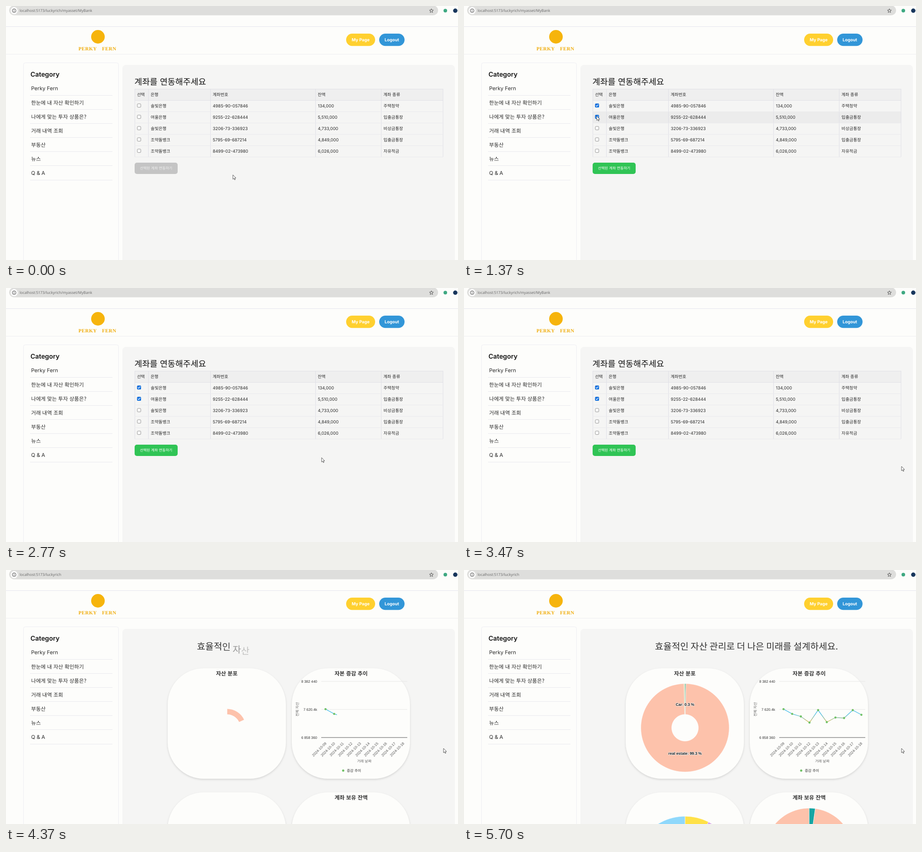
Write an HTML page that moves like this. It is 998x561 px and loops after 5.73 s.

```html
<!DOCTYPE html>
<html lang="ko">
<head>
<meta charset="utf-8">
<title>Account linking</title>
<style>
  html, body { margin: 0; width: 100%; height: 100%; overflow: hidden; background: #fdfdfb; }
  svg { display: block; width: 998px; height: 561px; }
  text { text-rendering: geometricPrecision; white-space: pre; }
  .card { filter: drop-shadow(0 2px 2px rgba(0, 0, 0, .13)); }
</style>
</head>
<body>
<script>
const LOOP = 5730, LOADING = 3500, READY = 4080, CHART = 4090;
const KO = "'Noto Sans CJK KR', 'Noto Sans CJK JP', 'Noto Sans CJK', sans-serif";
const INTER = "Inter, sans-serif";
const ARIAL = "'Liberation Sans', Arial, sans-serif";
const PAGE = '#fdfdfb', SALMON = '#fdc2ab';

function el(parent, tag, attrs = {}) {
  const node = document.createElementNS('http://www.w3.org/2000/svg', tag);
  for (const key in attrs) node.setAttribute(key, attrs[key]);
  parent.append(node);
  return node;
}
const group = (parent, attrs) => el(parent, 'g', attrs);
const rect = (parent, x, y, width, height, fill, rx = 0, more = {}) =>
  el(parent, 'rect', { x, y, width, height, fill, rx, ...more });
const circle = (parent, cx, cy, r, fill, more = {}) => el(parent, 'circle', { cx, cy, r, fill, ...more });
const line = (parent, x1, y1, x2, y2, stroke) => el(parent, 'line', { x1, y1, x2, y2, stroke });

// Text is placed by its vertical centre.
function label(parent, str, x, cy, size, more = {}) {
  const korean = /[가-힣]/.test(str);
  const node = el(parent, 'text', {
    x, y: cy + size * (korean ? 0.4 : 0.36), 'font-size': size, fill: '#2a2a2a',
    'font-family': korean ? KO : INTER, ...more
  });
  node.textContent = str;
  return node;
}
const show = (node, on) => node.setAttribute('visibility', on ? 'visible' : 'hidden');
const clamp = v => Math.max(0, Math.min(1, v));
const sine = v => (1 - Math.cos(Math.PI * clamp(v))) / 2;

const svg = el(document.body, 'svg', { viewBox: '0 0 998 561' });
const defs = el(svg, 'defs');

// Page frame
rect(svg, 0, 0, 998, 561, PAGE);
rect(svg, 257, 130, 734, 460, '#f5f5f4', 8);
line(svg, 0, 45.5, 998, 45.5, '#e4e4ee');
line(svg, 0, 106.5, 998, 106.5, '#ededf0');
rect(svg, 38.5, 125.5, 210, 460, 'none', 4, { stroke: '#eeeef3' });

circle(svg, 203, 68, 15, '#f6b40c');
const brand = { 'font-family': "'Liberation Serif', Times, serif", 'font-weight': 700, fill: '#f0ae10', 'letter-spacing': 0.4 };
label(svg, 'PERKY', 160, 94.2, 11, brand);
label(svg, 'FERN', 212, 94.2, 11, brand);

function pill(x, width, fill, str) {
  rect(svg, x, 61, width, 27.3, fill, 13.6);
  label(svg, str, x + width / 2, 74.8, 9.4, { 'text-anchor': 'middle', 'font-weight': 700, fill: '#fff' });
}
pill(751, 64, '#ffd02f', 'My Page');
pill(824, 56, '#3296d8', 'Logout');

label(svg, 'Category', 54, 151.3, 14.3, { 'font-weight': 600, fill: '#111' });
['Perky Fern', '한눈에 내 자산 확인하기', '나에게 맞는 투자 상품은?', '거래 내역 조회', '부동산', '뉴스', 'Q & A']
  .forEach((str, i) => {
    const y = 182.2 + i * 31.05;
    label(svg, str, 55.5, y, 11.6);
    line(svg, 53, Math.round(y + 15) + 0.5, 235, Math.round(y + 15) + 0.5, '#e9e9ee');
  });

// Account table
const bank = group(svg);
label(bank, '계좌를 연동해주세요', 283.5, 167, 18.5, { fill: '#111' });
rect(bank, 284, 183, 681, 25, '#efefef');
const colX = [284.5, 314.5, 451.5, 683.5, 828.5, 965];
const rowY = i => 208 + i * 25;
const hovers = [0, 1, 2, 3, 4].map(i => rect(bank, 284, rowY(i), 681, 25, '#ececec'));
colX.forEach(x => line(bank, x, 183, x, 333, '#dfdfe6'));
for (let i = -1; i < 6; i++) line(bank, 284, rowY(i) + 0.5, 965, rowY(i) + 0.5, i < 1 ? '#e0e0e6' : '#eaeaed');
['선택', '은행', '계좌번호', '잔액', '계좌 종류'].forEach((str, c) =>
  label(bank, str, colX[c] + 4.7, 195.5, 9.4, { 'font-weight': 500 }));

const ticks = [];
[
  ['솔빛은행', '4985-90-057846', '134,000', '주택청약'],
  ['여울은행', '9255-22-628444', '5,510,000', '입출금통장'],
  ['솔빛은행', '3206-73-336923', '4,733,000', '비상금통장'],
  ['조약돌뱅크', '5795-69-687214', '4,849,000', '입출금통장'],
  ['조약돌뱅크', '8499-02-473980', '6,026,000', '자유적금']
].forEach((row, i) => {
  const y = rowY(i) + 12.5;
  row.forEach((str, c) => label(bank, str, colX[c + 1] + 5, y, 9.4));
  rect(bank, 290, y - 4.5, 7.6, 7.6, '#fff', 1.5, { stroke: '#777', 'stroke-width': 0.8 });
  const tick = group(bank);
  rect(tick, 289.5, y - 5, 8.6, 8.6, '#0d6fe0', 1.5);
  el(tick, 'path', { d: `M291.4 ${y - 0.7}l1.7 1.8 3.3-3.9`, fill: 'none', stroke: '#fff', 'stroke-width': 1.3 });
  ticks.push(tick);
});
const button = rect(bank, 284, 346, 95, 25, '#c4c4c4', 5);
const buttonText = label(bank, '선택된 계좌 연동하기', 331.5, 358.2, 8.1,
  { 'text-anchor': 'middle', 'font-weight': 500, fill: '#f0f0f0' });

// Dashboard
const dash = group(svg);
const SLOGAN = '효율적인 자산 관리로 더 나은 미래를 설계하세요.';
let penX = 421.5;
const letters = [...SLOGAN].map(ch => {
  const node = el(dash, 'text', { x: penX, y: 176.2, 'font-size': 20.2, 'font-family': KO, fill: '#333' });
  node.textContent = ch;
  penX += 20.2 * (ch === ' ' ? 0.224 : 0.92);
  return node;
});

[[357, 217], [631, 217], [357, 491], [631, 491]].forEach(([x, y]) =>
  rect(dash, x, y, 261, 244, PAGE, 80, { class: 'card' }));
[['자산 분포', 487.5, 228], ['자본 증감 추이', 762, 228], ['계좌 보유 잔액', 762, 502]].forEach(([str, x, y]) =>
  label(dash, str, x, y, 12, { 'text-anchor': 'middle', 'font-weight': 700, fill: '#333' }));

function sector(cx, cy, r0, r, from, to) {
  const at = (rad, deg) => {
    const a = (deg - 90) * Math.PI / 180;
    return `${cx + rad * Math.cos(a)} ${cy + rad * Math.sin(a)}`;
  };
  const big = to - from > 180 ? 1 : 0;
  return `M${at(r, from)}A${r} ${r} 0 ${big} 1 ${at(r, to)}L${at(r0, to)}A${r0} ${r0} 0 ${big} 0 ${at(r0, from)}Z`;
}
// Slices are [end angle, colour]; the whole pie opens from the top while it grows.
function pie(cx, cy, r0, r, slices) {
  const nodes = slices.map(([, fill]) => el(dash, 'path', { fill, stroke: '#fff', 'stroke-width': 0.6 }));
  return p => {
    let from = 0;
    slices.forEach(([to], i) => {
      nodes[i].setAttribute('d', sector(cx, cy, r0, r0 + (r - r0) * p, from * p, to * p));
      nodes[i].setAttribute('opacity', p > 0 ? 1 : 0);
      from = to;
    });
  };
}
const pies = [
  pie(488, 348.5, 29.5, 97.5, [[1.3, '#3f9f7f'], [358.7, SALMON], [359.99, '#c9d8a8']]),
  pie(488, 658, 1, 114, [[27, '#ffe148'], [120, '#d9a6e6'], [250, SALMON], [359.99, '#8fd8fb']]),
  pie(762, 624, 1, 98, [[8, '#16a5a3'], [359.99, SALMON]])
];
const pieLabels = [['Car: 0.3 %', 296.5], ['real estate: 99.3 %', 405]].map(([str, y]) =>
  label(dash, str, 488, y, 8.5, {
    'text-anchor': 'middle', 'font-weight': 700, 'font-family': ARIAL, fill: '#111',
    stroke: '#fff', 'stroke-width': 1.6, 'stroke-linejoin': 'round', 'paint-order': 'stroke'
  }));

// Line chart
const small = { 'font-family': ARIAL, fill: '#555', 'text-anchor': 'end' };
[['8 382 440', 246], ['7 620.4k', 308], ['6 858 360', 370]].forEach(([str, y], i) => {
  line(dash, 696, y, 886, y, i < 2 ? '#e6e6e6' : '#555');
  label(dash, str, 687, y, 7.9, { ...small, fill: '#333' });
});
label(dash, '전체 자산', 0, 0, 8, { 'text-anchor': 'middle', fill: '#666', transform: 'translate(643 307.5) rotate(-90)' });
label(dash, '거래 날짜', 791, 421.3, 8, { 'text-anchor': 'middle', fill: '#666' });
circle(dash, 744.5, 443, 2.5, '#72c267');
label(dash, '증감 추이', 752.5, 442.8, 8, { fill: '#333' });

const grad = el(defs, 'linearGradient', { id: 'trend', gradientUnits: 'userSpaceOnUse', x1: 0, y1: 307, x2: 0, y2: 337 });
[[0, '#36b4ee'], [0.4, '#45bbe0'], [1, '#e2b233']].forEach(([offset, color]) =>
  el(grad, 'stop', { offset, 'stop-color': color }));
const clip = rect(el(defs, 'clipPath', { id: 'reveal' }), 696, 236, 0, 140, '#000');
const trend = group(dash, { 'clip-path': 'url(#reveal)' });
const points = [307.3, 317.8, 323.5, 337, 309.5, 336, 325.8, 327, 309.5, 319.8].map((y, i) => [705.5 + i * 19.1, y]);
el(trend, 'polyline', { points: points.join(' '), fill: 'none', stroke: 'url(#trend)', 'stroke-width': 1.3 });
points.forEach(([x, y], i) => {
  circle(trend, x, y, 2.4, '#72c267');
  label(dash, '2024-10-' + String(9 + i).padStart(2, '0'), 0, 0, 8,
    { ...small, transform: `translate(${x + 0.5} 381.5) rotate(-45)` });
});

// Loading overlay
const overlay = group(svg);
rect(overlay, 0, 45, 998, 516, 'rgba(0,0,0,.5)');
circle(overlay, 519.3, 323.3, 32, 'none', { stroke: '#f2f2f2', 'stroke-width': 10 });
const arc = el(overlay, 'path', { d: sector(0, 0, 27, 37, -45, 45), fill: '#3498db' });

// Browser bar
rect(svg, 7, -1, 947, 21.5, '#dededc', 10.7);
circle(svg, 18, 10.3, 8, '#fafafa');
circle(svg, 18, 10.3, 4, 'none', { stroke: '#444', 'stroke-width': 1 });
el(svg, 'path', { d: 'M18 9.8v2.6M18 8v1', stroke: '#444', 'stroke-width': 1 });
const url = label(svg, '', 30, 10.4, 8.2, { 'font-family': "'Open Sans', 'Noto Sans', sans-serif", fill: '#666' });
const star = Array.from({ length: 10 }, (_, i) => {
  const a = i * Math.PI / 5, r = i % 2 ? 2 : 4.6;
  return [939.3 + r * Math.sin(a), 10.6 - r * Math.cos(a)];
});
el(svg, 'polygon', { points: star.join(' '), fill: 'none', stroke: '#444', 'stroke-width': 0.9, 'stroke-linejoin': 'round' });
circle(svg, 970, 10.3, 4, '#3fa982');
circle(svg, 992, 10.3, 4.8, '#17365c');

// Pointer: [time, x, y]
const PATH = [
  [0, 501, 373], [60, 500, 372], [330, 380, 283], [520, 308, 233.5], [580, 308, 233.5], [720, 293, 219], [950, 293, 219],
  [1150, 293, 243], [1600, 293, 243], [1850, 318, 300], [2070, 342, 344], [2200, 340, 358],
  [2450, 340, 358], [2720, 640, 372], [2980, 930, 386], [3080, 966, 394], [LOOP, 966, 394]
];
const pointer = el(svg, 'path', {
  d: 'M0 0V9.6L2.2 7.6 3.8 11 5.3 10.3 3.8 7H6.8Z',
  fill: '#fff', stroke: '#333', 'stroke-width': 0.8, 'stroke-linejoin': 'round'
});
function pointerAt(t) {
  const i = PATH.findIndex(p => p[0] > t);
  const [t0, x0, y0] = PATH[i - 1], [t1, x1, y1] = PATH[i];
  const k = (t - t0) / (t1 - t0);
  return [x0 + (x1 - x0) * k, y0 + (y1 - y0) * k];
}

function render(t) {
  const onBank = t < LOADING;
  show(bank, onBank);
  show(overlay, !onBank && t < READY);
  show(dash, t >= READY);
  url.textContent = 'localhost:5173/luckyrich' + (onBank ? '/myasset/MyBank' : '');

  const [x, y] = pointerAt(t);
  pointer.setAttribute('transform', `translate(${x} ${y})`);

  const checked = [t >= 850, t >= 1350];
  ticks.forEach((tick, i) => show(tick, onBank && checked[i]));
  hovers.forEach((row, i) => show(row, onBank && x >= 284 && x < 965 && y >= rowY(i) && y < rowY(i + 1)));
  button.setAttribute('fill', checked[0] ? '#30c455' : '#c4c4c4');
  buttonText.setAttribute('fill', checked[0] ? '#fff' : '#f0f0f0');

  arc.setAttribute('transform', `translate(519.3 323.3) rotate(${(t - LOADING) * 0.18})`);

  letters.forEach((node, i) => {
    const k = clamp((t - 4060 - i * 43) / 200);
    node.setAttribute('opacity', k);
    node.setAttribute('transform', `translate(0 ${13 * (1 - k)})`);
  });
  const p = sine((t - CHART) / 1000);
  pies.forEach(draw => draw(p));
  clip.setAttribute('width', 190 * p);
  pieLabels.forEach(node => node.setAttribute('opacity', clamp((t - CHART - 1000) / 200)));
}

const start = performance.now();
function tick() {
  render((performance.now() - start) % LOOP);
  requestAnimationFrame(tick);
}
render(0);
requestAnimationFrame(tick);
</script>
</body>
</html>
```
